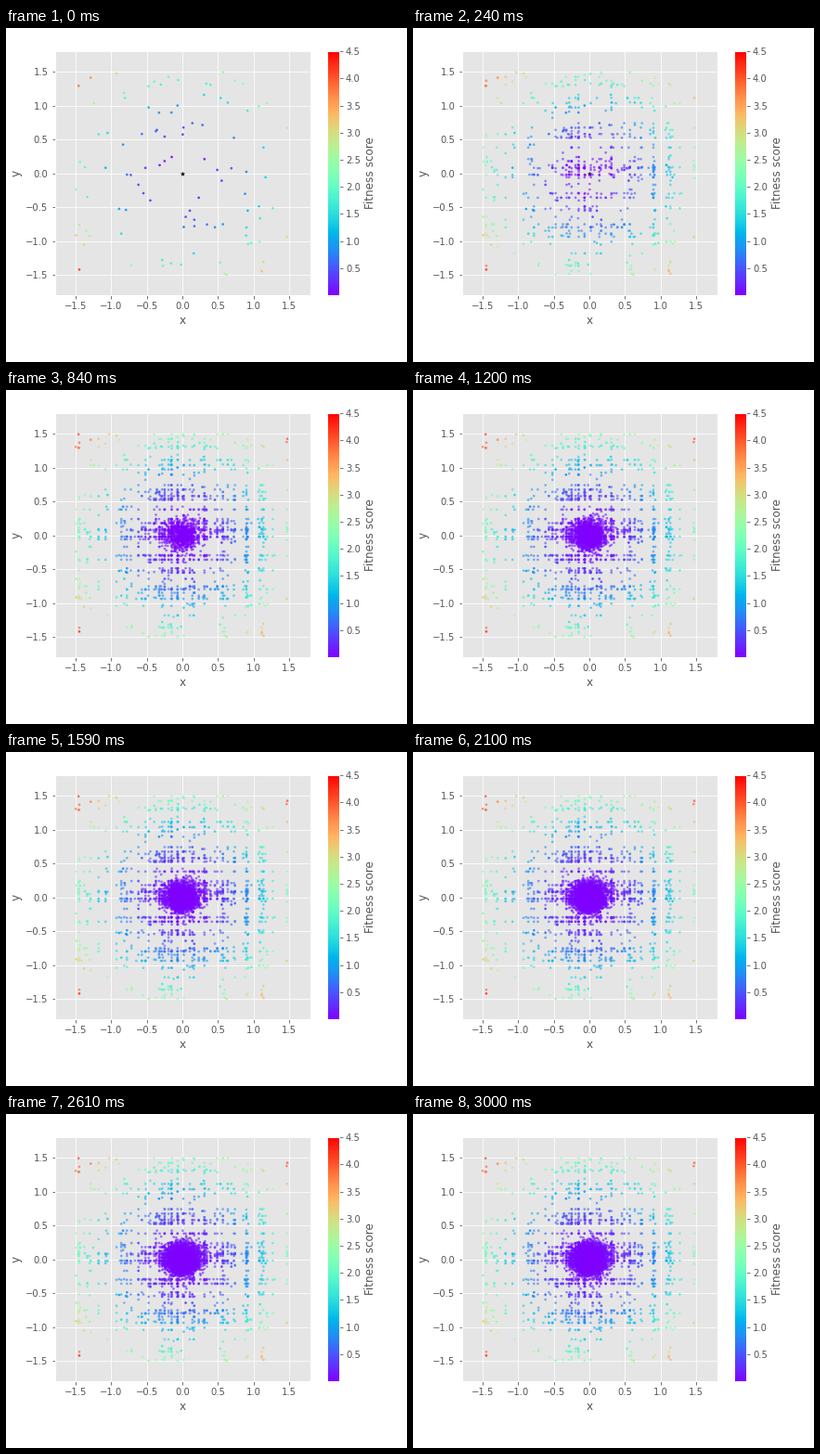
Write a matplotlib script that moves like this. It is 432x360 px and loops after 3030 ms.

```python
import numpy as np
import matplotlib.pyplot as plt
from matplotlib.animation import FuncAnimation
from matplotlib.cm import ScalarMappable
from matplotlib.colors import Normalize

W, H, FRAMES = 432, 360, 101
POP, BOUND = 100, 1.5
CROSSOVER_END = 16

plt.style.use("ggplot")
plt.rcParams["font.family"] = "DejaVu Sans"
rng = np.random.default_rng(5)

# strong individuals of the first generation, then its worst corners
LEADERS = [(-0.15, 0.24), (-0.25, 0.18), (-0.32, 0.12), (0.31, 0.21),
           (0.23, -0.36), (0.49, 0.05), (-0.52, 0.08), (0.14, 0.74),
           (-0.57, 0.58), (0.9, -0.8), (1.14, 0.38), (-0.78, -0.02),
           (0.57, 1.49), (-1.45, -1.42), (-1.46, 1.29), (-1.29, 1.41)]


def first_generation():
    pts = rng.uniform(-BOUND, BOUND, (3 * POP, 2))
    radius = np.hypot(*pts.T)
    pts = pts[(radius > 0.55) & (radius < 1.9)]
    return np.vstack([LEADERS, pts[:POP - len(LEADERS)]])


start = first_generation()
# some genes are passed on more often, which forms dense rows and columns
luck = rng.exponential(1, start.shape) + 0.15
luck[:len(LEADERS)] += 1


def inherit(axis, n, spread):
    genes = start[:, axis]
    w = luck[:, axis] * np.exp(-np.abs(genes) / spread)
    return rng.choice(genes, n, p=w / w.sum())


def crossover(n, spread):
    pts = np.column_stack([inherit(0, n, spread), inherit(1, n, spread)])
    mutated = rng.random(pts.shape) < 0.06
    return pts + mutated * rng.normal(0, 0.12, pts.shape)


def generation(t):
    if t == 0:
        return start
    if t <= CROSSOVER_END:
        return crossover(82, 0.35 + 0.9 * np.exp(-t / 8))
    age = t - CROSSOVER_END
    bred = crossover(int(2 + 22 * np.exp(-age / 12)), 0.4)
    return np.vstack([bred, rng.normal(0, 0.108, (56, 2))])


gens = [generation(t) for t in range(FRAMES)]
ends = np.cumsum([len(g) for g in gens])
points = np.vstack(gens).clip(-BOUND, BOUND)

norm = Normalize(0.003, 4.502)
rainbow = plt.get_cmap("rainbow")
colors = rainbow(norm((points ** 2).sum(axis=1)))
colors[:, 3] = 0.6
colors[:POP, 3] = 0.92

fig = plt.figure(figsize=(W / 72, H / 72), dpi=72, facecolor="white")
ax = fig.add_axes([52.6 / W, 72 / H, 275.4 / W, 263 / H])
ax.set(xlim=(-1.794, 1.801), ylim=(-1.7986, 1.8014), xlabel="x", ylabel="y")
ticks = np.arange(-1.5, 1.6, 0.5)
ax.set_xticks(ticks)
ax.set_yticks(ticks)

cax = fig.add_axes([345.9 / W, 72 / H, 13 / W, 263 / H])
bar = fig.colorbar(ScalarMappable(norm, rainbow), cax=cax,
                   ticks=np.arange(0.5, 4.6, 0.5))
bar.set_label("Fitness score")

ax.scatter([0], [0], marker="*", s=22, c="black", linewidths=0.3, zorder=2)
dots = ax.scatter([], [], s=7.2, linewidths=0, zorder=3)


def draw(i):
    n = ends[i]
    dots.set_offsets(points[:n])
    dots.set_facecolor(colors[:n])
    return (dots,)


anim = FuncAnimation(fig, draw, frames=FRAMES, init_func=lambda: draw(0),
                     interval=30, repeat=True, repeat_delay=0)
plt.show()
```
